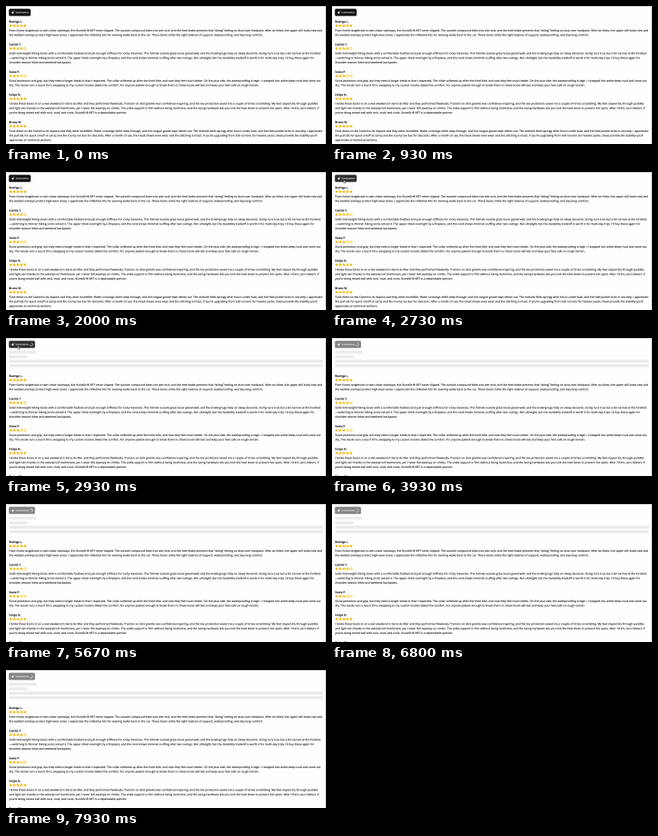
An HTML page with a canvas for the animation above (8000 ms loop, 400 by 173 pixels).

```html
<!DOCTYPE html>
<html lang="en">
<head>
<meta charset="utf-8">
<title>Review summary</title>
<style>
  html, body { margin: 0; width: 100%; height: 100%; overflow: hidden; background: #fff; }
  canvas { display: block; width: 400px; height: 173px; }
</style>
</head>
<body>
<canvas id="stage" width="400" height="173"></canvas>
<script>
const W = 400, H = 173, LOOP = 8000;
const FONT = '"Open Sans", "Noto Sans", sans-serif';
const BODY_SIZE = 3.505, LABEL_SIZE = 3.1, LINE = 5.72;
const CLICK = 2930, SHIFT = 28;
const ctx = document.getElementById('stage').getContext('2d');

const reviews = [
  { name: 'Rodrigo L.', stars: 5, lines: [
    'From forest singletrack to wet urban stairways, the StoneDrift KRT never slipped. The outsole compound bites into wet rock, and the heel brake prevents that “skiing” feeling on dust-over-hardpack. After six hikes, the upper still looks new and',
    'the welded overlays protect high-wear areas. I appreciate the reflective hits for evening walks back to the car. These boots strike the right balance of support, waterproofing, and day-long comfort.'] },
  { name: 'Camila T.', stars: 4, lines: [
    'Solid mid-weight hiking boots with a comfortable footbed and just enough stiffness for rocky traverses. The Tolmek outsole grips loose gravel well, and the braking lugs help on steep descents. Sizing runs true but a bit narrow at the forefoot',
    '—switching to thinner hiking socks solved it. The upper dried overnight by a fireplace, and the rand shows minimal scuffing after two outings. Not ultralight, but the durability tradeoff is worth it for multi-day trips. I’d buy these again for',
    'shoulder-season hikes and weekend backpacks.'] },
  { name: 'Sonia P.', stars: 3, lines: [
    'Good protection and grip, but they need a longer break-in than I expected. The collar softened up after the third hike, and now they feel much better. On the plus side, the waterproofing is legit—I stepped into ankle-deep mud and came out',
    'dry. The insole runs a touch firm; swapping to my custom insoles dialed the comfort. For anyone patient enough to break them in, these boots will last and keep your feet safe on rough terrain.'] },
  { name: 'Felipe N.', stars: 5, lines: [
    'I broke these boots in on a wet weekend in Serra do Mar and they performed flawlessly. Traction on slick granite was confidence-inspiring, and the toe protection saved me a couple of times scrambling. My feet stayed dry through puddles',
    'and light rain thanks to the waterproof membrane, yet I never felt swampy on climbs. The ankle support is firm without being restrictive, and the lacing hardware lets you lock the heel down to prevent hot spots. After 18 km, zero blisters. If',
    'you’re doing mixed trail with rock, mud, and roots, StoneDrift KRT is a dependable partner.'] },
  { name: 'Bruno W.', stars: 5, lines: [
    'Took these on the Caminho do Itupava and they were incredible. Water crossings didn’t seep through, and the tongue gusset kept debris out. The midsole feels springy after hours under load, and the heel pocket locks in securely. I appreciate',
    'the pull tab for quick on/off at camp and the roomy toe box for descents. After a month of use, the tread shows even wear and the stitching is intact. If you’re upgrading from trail runners for heavier packs, these provide the stability you’ll',
    'appreciate on technical sections.'] }
];

const clamp01 = v => Math.min(1, Math.max(0, v));
const mix = (a, b, p) => a + (b - a) * p;
const progress = (t, from, to) => clamp01((t - from) / (to - from));
const ease = p => p * p * (3 - 2 * p);

// Paints large and halves three times, so tiny text stays smooth and evenly spaced.
function layer(width, height, paint) {
  let scale = 8, image = null;
  for (; scale >= 1; scale /= 2) {
    const canvas = document.createElement('canvas');
    canvas.width = width * scale;
    canvas.height = height * scale;
    const c = canvas.getContext('2d');
    if (image) {
      c.drawImage(image, 0, 0, canvas.width, canvas.height);
    } else {
      c.scale(scale, scale);
      paint(c);
    }
    image = canvas;
  }
  return image;
}

// A hairline outline gives the small letters their full weight.
function text(c, string, x, middle, size, weight, color) {
  c.save();
  c.translate(x, middle + size * 0.34);
  c.scale(size / 100, size / 100);
  c.font = `${weight} 100px ${FONT}`;
  c.textBaseline = 'alphabetic';
  c.lineJoin = 'round';
  c.lineWidth = 2.5;
  c.fillStyle = c.strokeStyle = color;
  c.fillText(string, 0, 0);
  c.strokeText(string, 0, 0);
  c.restore();
}

function starPath(c, x, y, points, outer, inner) {
  c.beginPath();
  for (let i = 0; i < points * 2; i++) {
    const a = i * Math.PI / points - Math.PI / 2;
    const r = i % 2 ? inner : outer;
    c.lineTo(x + r * Math.cos(a), y + r * Math.sin(a));
  }
  c.closePath();
}

function paintReviews(c) {
  let y = 19.7;
  for (const { name, stars, lines } of reviews) {
    text(c, name, 3.9, y, BODY_SIZE, 600, '#000');
    c.fillStyle = c.strokeStyle = '#f2b90c';
    c.lineWidth = 0.4;
    for (let i = 0; i < 5; i++) {
      const full = i < stars;
      starPath(c, 5.8 + i * 4.5, y + 5, 5, full ? 2.3 : 2.05, full ? 1.05 : 0.95);
      full ? c.fill() : c.stroke();
    }
    lines.forEach((line, i) => text(c, line, 3.9, y + 10.95 + i * LINE, BODY_SIZE, 400, '#000'));
    y += 17.2 + lines.length * LINE;
  }
}

function paintLabel(c) {
  c.fillStyle = '#fff';
  starPath(c, 8.4, 8.3, 4, 2.1, 0.8);
  c.fill();
  starPath(c, 10, 6.5, 4, 0.8, 0.3);
  c.fill();
  text(c, 'Summarize', 12, 8.1, LABEL_SIZE, 400, '#fff');
}

function paintCursor(c) {
  c.beginPath();
  [[0.5, 0.4], [0.5, 4.2], [1.4, 3.4], [2, 4.7], [2.6, 4.4], [2, 3.2], [3.2, 3.1]]
    .forEach(([x, y]) => c.lineTo(x, y));
  c.closePath();
  c.fillStyle = '#fff';
  c.strokeStyle = '#222';
  c.lineWidth = 0.35;
  c.fill();
  c.stroke();
}

const reviewLayer = layer(W, H, paintReviews);
const labelLayer = layer(40, 16, paintLabel);
const cursorLayer = layer(6, 6, paintCursor);

function roundBox(x, y, w, h, r, color) {
  ctx.fillStyle = color;
  ctx.beginPath();
  ctx.roundRect(x, y, w, h, r);
  ctx.fill();
}

function drawPage(loading) {
  ctx.fillStyle = '#fefefe';
  ctx.fillRect(0, 0, W, H);
  ctx.drawImage(reviewLayer, 0, loading ? SHIFT : 0);
  ctx.fillStyle = '#d4d4d4';
  ctx.fillRect(0, 0, W, 1);
  ctx.fillRect(W - 1, 0, 1, H);
}

function drawButton(t, loading) {
  const hover = progress(t, 2530, 2700);
  const disabled = progress(t, 3000, 3250);
  const shade = Math.round(mix(mix(17, 46, hover), 132, disabled));
  roundBox(3.6, 3.6, loading ? 32.7 : 27.2, 9, 1.6, `rgb(${shade},${shade},${shade})`);
  ctx.drawImage(labelLayer, 0, 0);
}

function drawSpinner(t) {
  // The gap sits at the upper left just before each full second.
  const gap = Math.PI * 1.25 + (t - 930) / 1000 * Math.PI * 2;
  ctx.strokeStyle = '#fff';
  ctx.lineWidth = 0.55;
  ctx.beginPath();
  ctx.arc(31.6, 8.2, 1.8, gap + Math.PI / 4, gap + Math.PI * 1.75);
  ctx.stroke();
}

function drawSkeleton() {
  [[16, 34], [21.8, 23], [27.3, 392], [33, 392]]
    .forEach(([y, w]) => roundBox(4, y, w, 3.6, 1, '#ebebeb'));
}

function drawCursor(t) {
  if (t < 2400 || t > 3400) return;
  const enter = ease(progress(t, 2400, 2600));
  const leave = ease(progress(t, 3000, 3400));
  ctx.drawImage(cursorLayer,
    mix(mix(22, 14.3, enter), 7, leave),
    mix(mix(30, 9.6, enter), -7, leave));
}

function draw() {
  const t = performance.now() % LOOP;
  const loading = t >= CLICK;
  drawPage(loading);
  drawButton(t, loading);
  if (loading) {
    drawSkeleton();
    drawSpinner(t);
  }
  drawCursor(t);
  requestAnimationFrame(draw);
}
draw();
</script>
</body>
</html>
```
